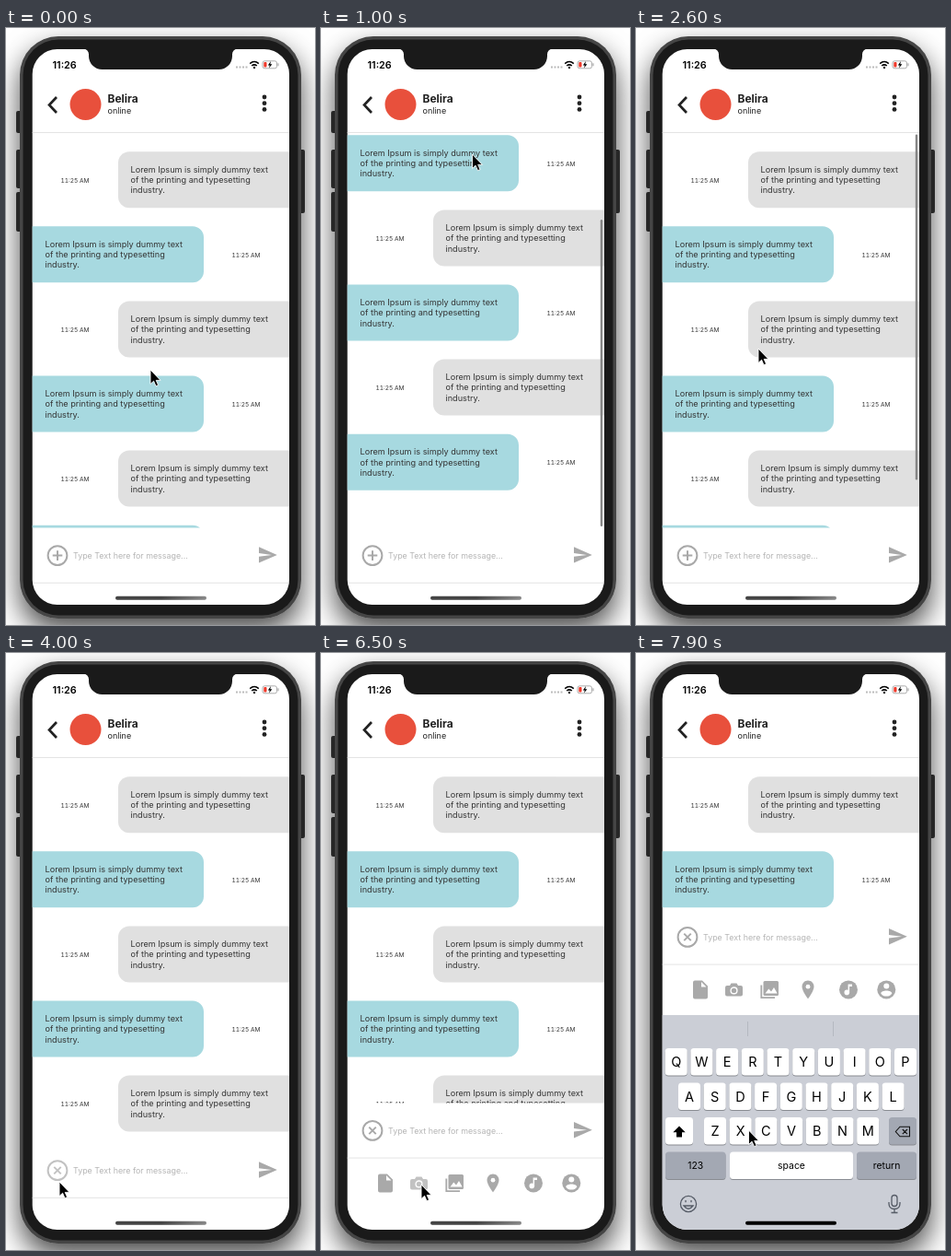
An HTML page that plays this animation: 336 px wide and 648 px high, repeating every 8000 ms.

```html
<!DOCTYPE html>
<html lang="en">
<head>
<meta charset="utf-8">
<title>Chat screen</title>
<style>
  html, body { margin: 0; width: 100%; height: 100%; overflow: hidden; background: #fff; }
  svg { display: block; width: 100%; height: 100%; font-family: Inter, Roboto, sans-serif; }
  .msg { font-size: 9.13px; fill: #333; }
  .time { font-size: 6.6px; fill: #333; text-anchor: middle; font-variant-numeric: tabular-nums; }
  .key { font-size: 14.5px; text-anchor: middle; }
  .word { font-size: 10.4px; text-anchor: middle; }
</style>
</head>
<body>
<svg viewBox="0 0 336 648">
  <defs>
    <filter id="shadow" x="-20%" y="-10%" width="140%" height="120%">
      <feDropShadow dx="0" dy="14" stdDeviation="15" flood-opacity=".7"/>
    </filter>
    <linearGradient id="homeShade"><stop offset=".5" stop-color="#444"/><stop offset="1" stop-color="#888"/></linearGradient>
    <clipPath id="screen"><rect x="28.7" y="23" width="279.3" height="603" rx="27"/></clipPath>
    <clipPath id="listClip"><rect id="listRect" x="28" y="114" width="280" height="429"/></clipPath>
    <clipPath id="trayClip"><rect id="trayRect" x="28" y="400" width="280" height="203"/></clipPath>
  </defs>

  <!-- Phone body -->
  <g fill="#3a3a3a">
    <rect x="11" y="90" width="8" height="24" rx="2"/>
    <rect x="11" y="132" width="8" height="42" rx="2"/>
    <rect x="11" y="178" width="8" height="43" rx="2"/>
    <rect x="317" y="132" width="8" height="69" rx="2"/>
  </g>
  <rect x="15" y="9" width="306" height="632" rx="42" fill="#444" filter="url(#shadow)"/>
  <rect x="18.5" y="12.5" width="299" height="625" rx="38.5" fill="#1a1a1a"/>

  <g clip-path="url(#screen)">
    <rect x="28" y="23" width="280" height="603" fill="#fff"/>
    <g clip-path="url(#listClip)">
      <g id="messages"></g>
      <rect id="scrollbar" x="303.8" width="2.4" rx="1.2" fill="#858585"/>
    </g>

    <!-- Header -->
    <path d="M28 113.5H308" stroke="#e4e4e4"/>
    <path d="M55 75L47 83.5L55 92" fill="none" stroke="#222" stroke-width="2.7"/>
    <circle cx="86.5" cy="83" r="17" fill="#e8503c"/>
    <text x="110.5" y="81.3" font-size="12" font-weight="700" fill="#222">Belira</text>
    <text x="110.5" y="93" font-size="9" fill="#222">online</text>
    <g fill="#222">
      <circle cx="281" cy="75" r="2.4"/><circle cx="281" cy="81.7" r="2.4"/><circle cx="281" cy="88.4" r="2.4"/>
    </g>

    <!-- Status bar -->
    <text x="50.5" y="43.6" font-size="10.8" font-weight="600">11:26</text>
    <path d="M250 42.5h13" stroke="#bbb" stroke-width="2" stroke-dasharray="2 1.5"/>
    <g fill="none" stroke="#000" stroke-width="1.6">
      <path d="M265.2 38.6q4.8 -4.2 9.6 0M267.2 41q2.8 -2.4 5.6 0"/>
      <circle cx="270" cy="43" r=".4"/>
    </g>
    <rect x="279" y="35.8" width="15.5" height="8" rx="2.2" fill="#fff" stroke="#999" stroke-width=".8"/>
    <rect x="280.3" y="37" width="3.2" height="5.6" rx="1" fill="#f0392b"/>
    <path d="M296 38.3v3" stroke="#999"/>
    <path d="M288 36L284.8 40.4H286.8L286 43.6L289.4 39.2H287.3Z"/>

    <!-- Composer, drawn around y = 0 -->
    <g id="composer">
      <g id="plus" fill="none" stroke="#a9a9a9" stroke-width="2">
        <circle r="10.4"/><path d="M-5.3 0H5.3M0 -5.3V5.3"/>
      </g>
      <text x="73" y="3.2" font-size="8.9" fill="#b5b5b5">Type Text here for message...</text>
      <path id="caret" d="M73.5 -5.5V6" stroke="#2e5c9a" stroke-width="1.4"/>
      <path d="M275 -9.3L294.8 -.7L275 8V1.2L289 -.7L275 -2.5Z" fill="#a9a9a9"/>
      <path d="M28 29.7H308" stroke="#e4e4e4"/>
    </g>

    <!-- Attachment tray, drawn around y = 0 -->
    <g clip-path="url(#trayClip)">
      <g id="tray" fill="#a9a9a9">
        <path id="file" d="M64 -10h8l6 6v12q0 2 -2 2h-12q-2 0 -2 -2v-16q0 -2 2 -2zm7 1.5v5.5h5.5z" fill-rule="evenodd"/>
        <g id="camera">
          <path d="M99 -4.5h3l1.5 -2.5h6l1.5 2.5h3q2 0 2 2v7.5q0 2 -2 2h-15q-2 0 -2 -2v-7.5q0 -2 2 -2z"/>
          <circle cx="106.5" cy="1" r="3.4" fill="none" stroke="#fff" stroke-width="1.4"/>
        </g>
        <g>
          <path d="M136.3 -5V8.7H151" fill="none" stroke="#a9a9a9" stroke-width="1.8"/>
          <rect x="138.5" y="-9.3" width="16.5" height="16" rx="1.5"/>
          <path d="M140.5 4L144.3 -1L147 2.2L150 -2.5L153.6 4Z" fill="#fff"/>
        </g>
        <path d="M187 -10c-3.7 0 -6.5 2.9 -6.5 6.7c0 5 6.5 13.3 6.5 13.3s6.5 -8.3 6.5 -13.3c0 -3.8 -2.8 -6.7 -6.5 -6.7z"/>
        <circle cx="187" cy="-3.2" r="2.4" fill="#fff"/>
        <circle cx="231" r="10"/>
        <g fill="#fff"><circle cx="229.3" cy="3" r="2.8"/><path d="M230.6 -6h4.4v2.6h-2.9v6.4h-1.5z"/></g>
        <circle cx="272.3" r="10"/>
        <g fill="#fff"><circle cx="272.3" cy="-4" r="3"/><path d="M266.3 4c0 -4 12 -4 12 0q-2.2 3.2 -6 3.2t-6 -3.2z"/></g>
      </g>
    </g>

    <!-- Keyboard, top edge at y = 0 -->
    <g id="keyboard">
      <rect x="28" width="280" height="300" fill="#cbced6"/>
      <path d="M121.5 7V23M214.5 7V23" stroke="#b4b8c0"/>
      <g id="keys"></g>
      <path d="M47 120.5L40.3 127.3H44V132.5H50V127.3H53.7Z"/>
      <g fill="none" stroke="#111" stroke-width="1.1">
        <path d="M282.3 126.5L287 121.2H297.5V131.8H287ZM289.8 124L295 129.2M295 124L289.8 129.2"/>
      </g>
      <g fill="none" stroke="#555b66" stroke-width="1.3">
        <circle cx="57" cy="205" r="8.6"/>
        <path d="M52 207q5 6.5 10 0zM54 201v2.2M60 201v2.2"/>
        <rect x="278" y="195.5" width="6" height="12" rx="3"/>
        <path d="M275 203v1.5q0 6 6 6t6 -6v-1.5M281 210.5v4M277.5 214.5h7"/>
      </g>
    </g>
    <rect id="home" x="119" y="616.8" width="99" height="4" rx="2"/>
  </g>
  <path d="M84 22.5a6 6 0 0 1 6 6v2a14.5 14.5 0 0 0 14.5 14.5h127a14.5 14.5 0 0 0 14.5 -14.5v-2a6 6 0 0 1 6 -6z" fill="#1a1a1a"/>

  <path id="cursor" d="M0 0V15.5L3.6 12.2L6 17.7L8.6 16.6L6.2 11.4H11Z" stroke="#fff" stroke-width=".9"/>
</svg>
<script>
const LOOP = 8000;
const $ = id => document.getElementById(id);
const clamp = (v, lo, hi) => Math.min(hi, Math.max(lo, v));

// Messages alternate between sent (right) and received (left).
const LINES = ['Lorem Ipsum is simply dummy text', 'of the printing and typesetting', 'industry.'];
$('messages').innerHTML = Array.from({ length: 6 }, (_, i) => {
  const top = 134.2 + i * 81.1, sent = i % 2 === 0;
  const shape = sent
    ? `M308 ${top}H134a12 12 0 0 0 -12 12v37a12 12 0 0 0 12 12H308z`
    : `M28 ${top}H203a12 12 0 0 1 12 12v37a12 12 0 0 1 -12 12H28z`;
  const text = LINES.map((line, n) =>
    `<text class="msg" x="${sent ? 135.5 : 42.5}" y="${top + 22.5 + n * 11.3}">${line}</text>`).join('');
  return `<path d="${shape}" fill="${sent ? '#e0e0e0' : '#a7d9e0'}"/>${text}
    <text class="time" x="${sent ? 75 : 261}" y="${top + 33.4}">11:25 AM</text>`;
}).join('');

// Keys
const WHITE = '#fff', GREY = '#a3a8b3';
const key = (x, y, width, fill, label = '', style = 'key', baseline = 20) => `
  <rect x="${x}" y="${y + 1}" width="${width}" height="29.5" rx="3.5" fill="#898c92"/>
  <rect x="${x}" y="${y}" width="${width}" height="29.5" rx="3.5" fill="${fill}"/>
  <text class="${style}" x="${x + width / 2}" y="${y + baseline}">${label}</text>`;
const row = (letters, center, y) =>
  [...letters].map((letter, i) => key(center + i * 27.7 - 12, y, 24, WHITE, letter)).join('');
$('keys').innerHTML = row('QWERTYUIOP', 43.7, 36) + row('ASDFGHJKL', 58, 73.5) + row('ZXCVBNM', 86, 111)
  + key(32, 111, 30, WHITE) + key(275, 111, 30, GREY)
  + key(32, 148.5, 65.5, GREY, '123', 'word', 18.7)
  + key(102, 148.5, 134, WHITE, 'space', 'word', 18.7)
  + key(240, 148.5, 65, GREY, 'return', 'word', 18.7);

// Keyframes are [time, value, ...]; each segment eases in and out.
function track(t, keys, column = 1) {
  const next = keys.findIndex(k => k[0] > t);
  if (next === 0) return keys[0][column];
  if (next < 0) return keys[keys.length - 1][column];
  const a = keys[next - 1], b = keys[next];
  const u = (t - a[0]) / (b[0] - a[0]);
  return a[column] + (b[column] - a[column]) * u * u * (3 - 2 * u);
}
const easeOut = (t, start, duration) => 1 - (1 - clamp((t - start) / duration, 0, 1)) ** 3;
const press = (t, start, end) =>
  track(t, [[start - 50, 1], [start, .6], [end, .6], [end + 150, 1]]);

const SCROLL = [[300, 0], [950, 99], [1050, 99], [1250, 57], [1350, 57], [1600, -44], [1700, -44], [2100, 0]];
const SCROLLBAR = [[300, 0], [400, 1], [2850, 1], [3150, 0]];
const CURSOR = [
  [300, 157, 371], [950, 164.5, 137], [1350, 164.5, 137], [1600, 164.5, 246], [2150, 164.5, 252],
  [2600, 133, 348], [2950, 58, 574], [4300, 58, 574], [4850, 77, 576.5], [5600, 77, 576.5],
  [5950, 109, 577], [6500, 109, 577], [7000, 122.5, 518]
];
const MAX_SCROLL = 57;

function render(t) {
  const scroll = track(t, SCROLL);
  const inside = clamp(scroll, 0, MAX_SCROLL);
  const barLength = 375 - Math.abs(scroll - inside);
  $('messages').setAttribute('transform', `translate(0 ${-scroll})`);
  $('scrollbar').setAttribute('y', 115.5 + (425.5 - barLength) * inside / MAX_SCROLL);
  $('scrollbar').setAttribute('height', barLength);
  $('scrollbar').setAttribute('opacity', track(t, SCROLLBAR));

  // The content trails the keyboard slightly.
  const keyboardTop = 626 - 233 * easeOut(t, 7098, 330);
  const trayBottom = 603 - 210 * easeOut(t, 7107, 330);
  const composerY = trayBottom - track(t, [[3900, 30.4], [4250, 84.6]]);
  $('keyboard').setAttribute('transform', `translate(0 ${keyboardTop})`);
  $('composer').setAttribute('transform', `translate(0 ${composerY})`);
  $('tray').setAttribute('transform', `translate(0 ${composerY + 57})`);
  $('listRect').setAttribute('height', composerY - 30 - 114);
  $('trayRect').setAttribute('y', composerY + 30);
  $('trayRect').setAttribute('height', Math.max(0, trayBottom - composerY - 30));

  $('plus').setAttribute('transform', `translate(56 0) rotate(${t < 3900 ? 0 : 45})`);
  $('plus').setAttribute('opacity', press(t, 3800, 3950));
  $('file').setAttribute('opacity', press(t, 5200, 5420));
  $('camera').setAttribute('opacity', press(t, 6200, 6450));
  $('caret').setAttribute('opacity', t >= 7100 && t < 7600 ? 1 : 0);
  $('home').setAttribute('fill', keyboardTop < 626 ? '#000' : 'url(#homeShade)');
  $('cursor').setAttribute('transform', `translate(${track(t, CURSOR)} ${track(t, CURSOR, 2)})`);
}

function tick() {
  render(performance.now() % LOOP);
  requestAnimationFrame(tick);
}
tick();
</script>
</body>
</html>
```
